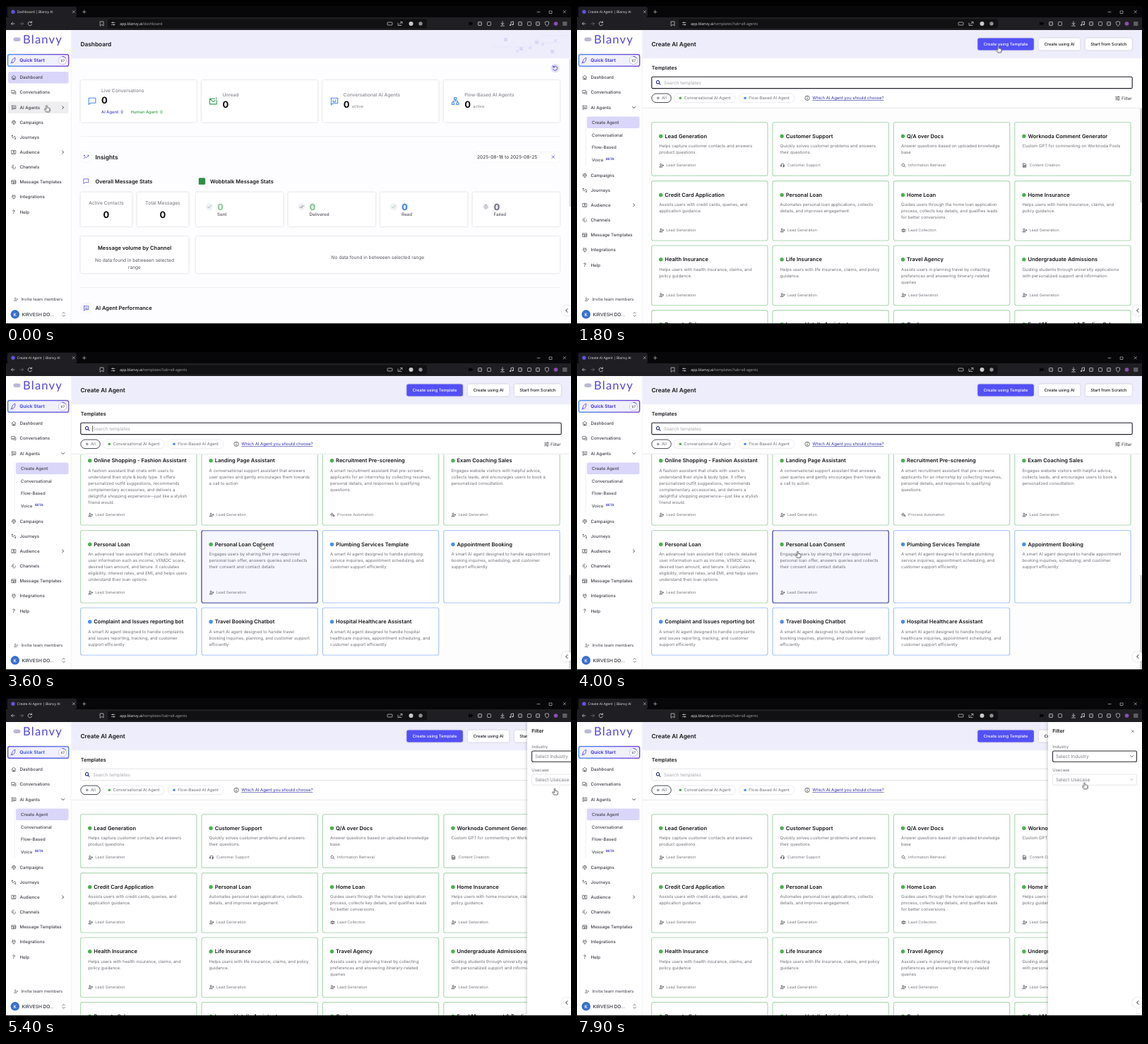
These frames come from a looping animation (800 px wide and 450 px high, 8000 ms). An HTML page:

```html
<!DOCTYPE html>
<html lang="en">
<head>
<meta charset="utf-8">
<title>Agent templates</title>
<style>
html,body{margin:0;width:100%;height:100%;overflow:hidden;background:#fff}
svg{display:block;width:800px;height:450px;font-family:Inter,sans-serif;text-rendering:geometricPrecision}
.ui{font-family:"Open Sans",sans-serif}
.brand{font-family:Lato,sans-serif;letter-spacing:1.2px}
.sh{filter:drop-shadow(0 .7px .9px #0003)}
.step{animation:8s step-end infinite}
.move{animation:8s linear infinite}
.pre{animation-name:pre}
.post{animation-name:post}
.closed{animation-name:closed}
.opened{animation-name:opened}
.low{animation-name:low}
.cards{animation-name:cards}
.focus{animation-name:focus}
.hover{animation-name:hover}
.scroll{animation-name:scroll}
.thumb{animation-name:thumb}
.panel{animation-name:panel;animation-timing-function:ease-out;filter:drop-shadow(-1px 0 2px #0003)}
.drop{animation-name:drop}
.pick{animation-name:pick}
.list{animation-name:list}
.bar{animation-name:bar}
.cursor{animation:cursor 8s ease-in-out infinite}
.caret{animation:blink .8s step-end -.45s infinite}
.glow{animation:glow 1s ease-in-out infinite alternate}
.tint{animation:tint 1s ease-in-out infinite alternate}
@keyframes pre{0%{opacity:1}7.5%,100%{opacity:0}}
@keyframes post{0%{opacity:0}7.5%,100%{opacity:1}}
@keyframes closed{0%{opacity:1}3.1%,100%{opacity:0}}
@keyframes opened{0%{opacity:0}3.1%,100%{opacity:1}}
@keyframes low{0%,2%{transform:translateY(0)}3.6%,100%{transform:translateY(75px)}}
@keyframes cards{0%{opacity:0}13.75%,100%{opacity:1}}
@keyframes focus{0%{opacity:1}66.25%,100%{opacity:0}}
@keyframes hover{
 0%{opacity:0;x:448px;y:164.5px;height:75.7px}
 30%{opacity:1;x:448px;y:164.5px;height:75.7px}
 35%{opacity:1;x:277px;y:247.7px;height:84.3px}
 37.5%{opacity:1;x:277px;y:339px;height:84.5px}
 42%{opacity:1;x:277px;y:522.5px;height:111px}
 45%{opacity:1;x:277px;y:641px;height:102.5px}
 56.5%{opacity:1;x:448px;y:430.7px;height:84.5px}
 60.5%{opacity:1;x:448px;y:339px;height:84.5px}
 62%{opacity:1;x:448px;y:247.7px;height:84.3px}
 63.5%,100%{opacity:0;x:448px;y:247.7px;height:84.3px}}
@keyframes scroll{
 0%,35.6%{transform:translateY(0)}38.6%,39.4%{transform:translateY(-166.5px)}
 45%,53.75%{transform:translateY(-388.5px)}58.6%,59.4%{transform:translateY(-138.5px)}
 63%,100%{transform:translateY(0)}}
@keyframes thumb{
 0%,35.6%{transform:translateY(0)}38.6%,39.4%{transform:translateY(73px)}
 45%,53.75%{transform:translateY(171px)}58.6%,59.4%{transform:translateY(61px)}
 63%,100%{transform:translateY(0)}}
@keyframes panel{0%,66.25%{transform:translateX(140px)}70%,100%{transform:translateX(0)}}
@keyframes drop{0%{opacity:0}75%{opacity:1}93.75%,100%{opacity:0}}
@keyframes pick{0%{transform:translateY(-33.2px)}76.5%{transform:translateY(-16.6px)}
 77.5%{transform:translateY(0)}80%{transform:translateY(16.6px)}81.5%,100%{transform:translateY(33.2px)}}
@keyframes list{0%,82.5%{transform:translateY(0)}86%,100%{transform:translateY(-66.4px)}}
@keyframes bar{0%,82.5%{transform:translateY(0)}86%,100%{transform:translateY(38px)}}
@keyframes cursor{
 0%,2.5%{transform:translate(57.5px,140.5px)}
 6.25%,8%{transform:translate(48px,162px)}
 20%,23.5%{transform:translate(596.5px,56.5px)}
 26%{transform:translate(616px,80px)}
 30%{transform:translate(520px,190px)}
 33.75%{transform:translate(470px,243px)}
 36.25%,42%{transform:translate(431px,253px)}
 47.5%,53.5%{transform:translate(312.5px,282px)}
 56.25%,61.5%{transform:translate(453.5px,262.5px)}
 65%,67.5%{transform:translate(777px,128px)}
 72.5%,75%{transform:translate(730px,81px)}
 78.75%{transform:translate(686.5px,146.5px)}
 82%,87.5%{transform:translate(692px,168px)}
 92.5%,94%{transform:translate(714px,84px)}
 97.5%,100%{transform:translate(718.5px,119.5px)}}
@keyframes blink{0%{opacity:1}50%,100%{opacity:0}}
@keyframes glow{from{opacity:0}to{opacity:1}}
@keyframes tint{from{fill:#4f3fe0}to{fill:#3f6fe6}}
</style>
</head>
<body>
<svg id="stage" viewBox="0 0 800 450"></svg>
<script>
const INK = '#17171c', GRAY = '#6f7078', INDIGO = '#4a45d6', GREEN = '#4caf50', BLUE = '#4a8df0';

// y is the middle of the capitals
const T = (x, y, size, str, fill = INK, weight = 400, anchor = 'start', extra = '') =>
  `<text x="${x}" y="${y + size * .36}" font-size="${size}" fill="${fill}" font-weight="${weight}" text-anchor="${anchor}" ${extra}>${str}</text>`;
const R = (x, y, w, h, fill, r = 0, stroke = 'none', sw = 1, extra = '') =>
  `<rect x="${x}" y="${y}" width="${w}" height="${h}" rx="${r}" fill="${fill}" stroke="${stroke}" stroke-width="${sw}" ${extra}/>`;
const C = (x, y, r, fill, stroke = 'none', sw = 1) =>
  `<circle cx="${x}" cy="${y}" r="${r}" fill="${fill}" stroke="${stroke}" stroke-width="${sw}"/>`;
const P = (d, stroke, sw = .8, fill = 'none') =>
  `<path d="${d}" fill="${fill}" stroke="${stroke}" stroke-width="${sw}" stroke-linecap="round" stroke-linejoin="round"/>`;
const G = (cls, ...parts) => `<g class="${cls}">${parts.join('')}</g>`;

// icons live in a 24 unit box, centred on x, y
const ICONS = {
  home: 'M3 11 12 3 21 11M5 10V21H19V10M10 21V15H14V21',
  chats: 'M3 3H16V13H7L3 16ZM19 8H21V21L17 18H8V16',
  chat: 'M3 4H21V17H8L3 21Z',
  bot: 'M3 4H21V18H9L4 22V4M9 9V11M15 9V11M8 14H16',
  signal: 'M4 17A9 9 0 1 1 20 17M8 15A5 5 0 1 1 16 15M12 12V21M9 21H15',
  route: 'M5 3V13A4 4 0 0 0 12 13V10A4 4 0 0 1 19 10V21M3 5H8M16 19H21',
  person: 'M3 4H21V20H3ZM12 7A2.5 2.5 0 1 1 11.9 7M7 18C8 13 16 13 17 18',
  link: 'M13 3C6 3 3 8 4 13M11 21C18 21 21 16 20 11M8 9L12 12 9 16M4 13L8 17',
  grid: 'M3 4H21V20H3ZM3 10H21M10 10V20M10 15H21',
  plug: 'M8 2V8M16 2V8M5 8H19V12A7 6 0 0 1 5 12ZM12 18V22',
  mail: 'M3 6H16M21 10V20H3V6L12 14 17 10M20 3V7',
  flow: 'M9 3H15V8H9ZM3 16H9V21H3ZM15 16H21V21H15ZM12 8V12M6 16V12H18V16',
  trend: 'M3 18L9 11 13 15 21 6M18 5H21V9M5 5V8M3.5 6.5H6.5',
  find: 'M16 16L21 21M10 3A7 7 0 1 1 9.9 3',
  lead: 'M9 4A4 4 0 1 1 8.9 4M2 20C2 13 16 13 16 20ZM20 9V15M17 12H23',
  team: 'M12 5A3 3 0 1 1 11.9 5M5 8A2 2 0 1 1 4.9 8M19 8A2 2 0 1 1 18.9 8M7 19C7 13 17 13 17 19ZM2 18C2 14 5 14 6 15M22 18C22 14 19 14 18 15',
  head: 'M4 14V11A8 8 0 0 1 20 11V18L14 21M4 12H7V17H4ZM17 12H20V17H17Z',
  doc: 'M5 2H14L19 7V22H5ZM8 11H16M8 15H16M8 18H13',
  gear: 'M9 6A5 5 0 1 1 8.9 6M9 3V5M9 17V19M2 11H4M14 11H16M19 15A3 3 0 1 1 18.9 15',
  check: 'M4 13L9 18 20 6', checks: 'M2 13L7 18 16 6M10 16L12 18 22 6',
  clock: 'M12 3A9 9 0 1 1 11.9 3M12 7V13M12 16V17'
};
const I = (name, x, y, size, color, sw = 2) =>
  `<g transform="translate(${x - size / 2} ${y - size / 2}) scale(${size / 24})">${P(ICONS[name], color, sw)}</g>`;

const defs = `<defs>
<linearGradient id="a"><stop stop-color="#3f8cf5"/><stop offset="1" stop-color="#7a35dd"/></linearGradient>
<linearGradient id="b"><stop stop-color="#7a35dd"/><stop offset="1" stop-color="#4fa6f5"/></linearGradient>
<clipPath id="view"><rect x="93" y="144.5" width="704" height="304.5"/></clipPath>
<clipPath id="menu"><rect x="673" y="96" width="120" height="122"/></clipPath></defs>`;

function browser() {
  const w = '#d4d4d8';
  const tab = s => T(15.5, 8.3, 4.9, s, '#e6e6ea');
  const url = s => T(161, 25, 5.25, `app.blanvy.ai<tspan fill="#a4a4aa">/${s}</tspan>`, '#ececf0');
  const small = [671, 684, 728, 741, 753].map((x, i) => R(x - 2.5, 22.5, 5, 5, i % 2 ? 'none' : '#38383c', .8, w, .7));
  return G('ui',
    R(0, 0, 800, 34, '#070709'), R(2, 1, 98, 15, '#1f1f23', 3), R(0, 16, 800, 18, '#1f1f23'),
    R(144, 18.5, 452, 13, '#111114', 3), C(10, 8.3, 2.7, '#6152e6'),
    G('step pre', tab('Dashboard | Blanvy AI'), url('dashboard')),
    G('step post', tab('Create AI Agent | Blanvy AI'), url('templates?tab=all-agents')),
    P('M94.2 6.6 97.4 9.8M97.4 6.6 94.2 9.8M108.5 8.3H113M110.7 6V10.5', w, .6),
    P('M752 8.5H756M789 6.5 792.5 10M792.5 6.5 789 10M769.5 7H773V10.5H769.5Z', w, .6),
    P('M12 25H7.5M9.5 23 7.5 25 9.5 27', w, .7), P('M20 25H24.5M22.5 23 24.5 25 22.5 27', '#77777c', .7),
    P('M36.3 23.4A2.8 2.8 0 1 0 36.6 26M36.5 21.8V23.6H34.6', w, .8),
    P('M133.5 22H138V28L135.8 26.3 133.5 28Z', w, .7),
    P('M149.5 23.5H154M149.5 26.5H154M151 22.6V24.4M152.8 25.6V27.4', w, .7),
    R(540, 23, 7, 4, 'none', .8, w, .7), P('M555 24V27.5H560M557 26 561 22.5M558.5 22.5H561V25', w, .7),
    C(573.5, 25, 3, '#c9c9cf'), C(587, 25, 2.7, '#8d8d94'),
    P('M655.5 23V27L658 25ZM658.3 23V27L661 25Z', '#000', .8, '#000'), small.join(''),
    P('M703 22V26M701 24.3 703 26.3 705 24.3M700.5 28H705.5', w, .8),
    P('M715 27V22.5L718.5 22V26', w, .8), C(714, 27, 1, w), C(717.5, 26.3, 1, w),
    P('M763.5 22.5 766 21.8 768.5 22.5V25Q768 27.5 766 28.4 764 27.5 763.5 25Z', w, .7),
    C(778.5, 25, 2.8, '#8b4fb0'), P('M788.5 23H794M788.5 25H794M788.5 27H794', w, .7));
}

function sidebar() {
  const item = (name, y, label) => I(name, 11, y, 7.5, '#3b3c46', 2) + T(19.5, y, 6.2, label, '#3d3e48', 500);
  const right = y => P(`M79.7 ${y - 1.8} 81.7 ${y} 79.7 ${y + 1.8}`, '#33343d', .9);
  const low = [['signal', 'Campaigns'], ['route', 'Journeys'], ['person', 'Audience'], ['link', 'Channels'],
    ['grid', 'Message Templates'], ['plug', 'Integrations']].map(([n, s], i) => item(n, 164.5 + i * 21.15, s));
  const sub = ['Create Agent', 'Conversational', 'Flow-Based', 'Voice'].map((s, i) => T(21, 164.5 + i * 17.9, 6.1, s, '#42434d', 500));
  return G('',
    R(0, 34, 92, 416, '#fff'), P('M92.3 34V450', '#ececf1', .7),
    R(10.5, 44.5, 10, 5.5, '#b9b8d8', 2.7),
    T(24, 47, 16.6, 'Blanvy', '#5146dc', 400, 'start', 'class="brand"'),
    G('sh', R(2.6, 68.6, 86, 16.6, '#f1f0fe', 2.5, 'url(#a)', 1.2)),
    R(2.6, 68.6, 86, 16.6, 'none', 2.5, 'url(#b)', 1.2, 'class="glow"'),
    P('M8 80Q8 75 13 73Q13.5 78 10.5 80ZM8.5 79 7 81', '#4f46e5', .8),
    T(19.2, 77, 6.5, 'Quick Start', '#4f3fe0', 700, 'start', 'class="tint"'),
    C(80, 77, 5.6, '#fff', '#c5c2ee', .9), P('M80 71.4A5.6 5.6 0 0 1 84.4 73.6', '#4f46e5', 1),
    T(80, 77, 4.6, '1/7', '#33343d', 500, 'middle'),
    G('step pre', R(3, 93, 85.5, 16.5, '#d9d6fa', 2)),
    item('home', 101, 'Dashboard'), item('chats', 122.2, 'Conversations'),
    G('step closed', R(3, 135.5, 85.5, 16.5, '#eeeef1', 2), right(143.6)),
    item('bot', 143.6, 'AI Agents'),
    G('step opened', P('M78.8 142.6 80.7 144.6 82.6 142.6', '#33343d', .9), P('M12.5 157V226', '#e6e6ee', .6)),
    G('step post', R(14, 156.5, 74.5, 16.5, '#d9d6fa', 2)),
    G('step opened', sub.join(''), T(41, 216, 4.5, 'BETA', INDIGO, 700)),
    G('move low', low.join(''), right(206.8), T(11, 291.5, 7.5, '?', '#3d3e48', 500, 'middle'), T(19.5, 291.5, 6.2, 'Help', '#3d3e48', 500)),
    I('lead', 14, 415, 6, '#44454f'), T(21.5, 415, 5.95, 'Invite team members', '#44454f'),
    C(12.8, 436.3, 6.2, '#3a6fd0'), T(12.8, 436.3, 6.2, 'K', '#fff', 600, 'middle'),
    T(22.5, 436.3, 6.6, 'KIRVESH DO...', '#33343d', 500),
    P('M80 435 81.6 433.3 83.2 435M80 437.6 81.6 439.3 83.2 437.6', '#44454f', .7));
}

function dashboard() {
  const box = (x, y, w, h) => R(x, y, w, h, '#fff', 2);
  const head = (x, y, icon, label, size = 7.5, color = INDIGO) =>
    R(x, y - 7, 14, 14, '#fff', 2, '#eeeef4', .6) + I(icon, x + 7, y, 9, color) + T(x + 20, y, size, label, INK, 600);
  const top = [['chat', 'Live Conversations', 'Live', BLUE], ['mail', 'Unread', '', '#3a9a54'],
    ['bot', 'Conversational AI Agents', 'active', BLUE], ['flow', 'Flow-Based AI Agents', 'active', BLUE]].map(([n, s, kind, c], i) => {
    const x = 105.5 + i * 171.4, y = kind === 'Live' ? 120 : 126;
    return I(n, x + 16.5, 134.5, 13, c) + T(x + 29.5, y, 6.65, s, '#868790', 500) +
      T(x + 29.5, y + 13.5, 13, '0', '#0c0c10', 700) +
      (kind === 'active' ? T(x + 41.5, y + 16, 5.7, 'active', '#85868e') : '');
  });
  const stats = [['check', 'Sent', '#8fc99b', '#6b6c74'], ['checks', 'Delivered', '#7ac48a', '#6b6c74'],
    ['check', 'Read', '#3f7fe8', '#3fae5a'], ['clock', 'Failed', '#6b6b80', '#6b6c74']].map(([n, s, c, k], i) => {
    const x = 269 + i * 130.5;
    return C(x + 19, 284, 5, '#f1f1f5') + I(n, x + 19, 284, 6.5, k) + C(x + 34.5, 284, 5.5, c + '22') +
      T(x + 30.2, 284, 12.5, '0', c, 700) + T(x + 30, 294.5, 6.2, s, '#55565f', 500);
  });
  const cells = [0, 1, 2, 3];
  return G('step pre',
    R(92.6, 34, 708, 416, '#fdfdff'), R(92.6, 34, 708, 40, '#eeedfb'),
    cells.map(i => R(705 + i * 22, 45 + i * 13 % 22, 5, 5, '#d9d7f6') + R(722 + i * 18, 62 - i * 5, 4, 4, '#e0def8')).join(''),
    P('M690 58H740L758 42H796M730 68 752 52H785', '#e2e0f8', .6),
    T(105.5, 54, 8.3, 'Dashboard', INK, 600),
    C(777.5, 88, 6.3, '#e2e0fb'), P('M775 86.2A3.1 3.1 0 1 1 774.6 89.4M774.6 84.6V86.7H776.8', INDIGO, .9),
    G('sh', cells.map(i => box(105.5 + i * 171.4, 105, 164.3, 59.5)).join('')), top.join(''),
    T(135, 150, 5.85, 'AI Agent: 0', INDIGO, 500), T(176.5, 150, 5.85, 'Human Agent: 0', '#37a04b', 500),
    P('M106 184.7H784M106 398.5H784', '#e9e9f0', .7),
    head(106.5, 213.7, 'trend', 'Insights', 8.4), R(663.5, 206.5, 120, 14.6, '#fff', 2, '#f0f0f4', .6),
    T(667, 213.8, 6.6, '2025-08-18 to 2025-08-25', '#2a2b33'), P('M773 211.8 776.6 215.4M776.6 211.8 773 215.4', INDIGO, .8),
    head(106.5, 247.8, 'chat', 'Overall Message Stats'),
    R(271, 241.5, 13, 13, '#fff', 2, '#eeeef4', .6), R(272.8, 243.3, 9.4, 9.4, '#2f8f46', 1.5),
    T(289, 247.8, 7.5, 'Wobbtalk Message Stats', INK, 600),
    G('sh', box(105.5, 263.5, 73, 48.5), box(185.5, 263.5, 73, 48.5), cells.map(i => box(269 + i * 130.5, 263.5, 123.5, 48.5)).join(''),
      box(105.5, 326, 153, 52), box(269, 326, 515, 52)),
    T(142, 279, 6.65, 'Active Contacts', '#6f7078', 400, 'middle'), T(142, 295, 13, '0', '#0c0c10', 700, 'middle'),
    T(222, 279, 6.65, 'Total Messages', '#6f7078', 400, 'middle'), T(222, 295, 13, '0', '#0c0c10', 700, 'middle'),
    stats.join(''),
    T(182, 342, 7.5, 'Message volume by Channel', INK, 600, 'middle'),
    T(182, 359.8, 6.55, 'No data found in betweeen selected', '#55565f', 400, 'middle'), T(182, 370, 6.55, 'range', '#55565f', 400, 'middle'),
    T(526.3, 355.3, 6.55, 'No data found in betweeen selected range', '#55565f', 400, 'middle'),
    head(106.5, 427.5, 'bot', 'AI Agent Performance'),
    R(797.6, 75, 2, 209, '#d6d6da', 1));
}

const LEAD = 'lead:Lead Generation';
const ROWS = [
  { y: 164.5, h: 75.7, cards: [
    ['Lead Generation', 'Helps capture customer contacts and answers|product questions.', LEAD],
    ['Customer Support', 'Quickly solves customer problems and answers|their questions.', 'head:Customer Support'],
    ['Q/A over Docs', 'Answer questions based on uploaded knowledge|base', 'find:Information Retrieval'],
    ['Worknoda Comment Generator', 'Custom GPT for commenting on Worknoda Posts', 'doc:Content Creation']] },
  { y: 247.7, h: 84.3, cards: [
    ['Credit Card Application', 'Assists users with credit cards, queries, and|application guidance.', LEAD],
    ['Personal Loan', 'Automates personal loan applications, collects|details, and improves engagement.', LEAD],
    ['Home Loan', 'Guides users through the home loan application|process, collects key details, and qualifies leads|for better conversions.', 'team:Lead Collection'],
    ['Home Insurance', 'Helps users with home insurance, claims, and|policy guidance.', LEAD]] },
  { y: 339, h: 84.5, cards: [
    ['Health Insurance', 'Helps users with health insurance, claims, and|policy guidance.', LEAD],
    ['Life Insurance', 'Helps users with life insurance, claims, and policy|guidance.', LEAD],
    ['Travel Agency', 'Assists users in planning travel by collecting|preferences and answering itinerary-related|queries', LEAD],
    ['Undergraduate Admissions', 'Guiding students through university applications|with personalized support and information.', LEAD]] },
  { y: 430.7, h: 84.5, cards: [
    ['Property Sales', 'Collects buyer details and answers real estate|queries about property and pricing.', LEAD],
    ["Luxury Hotel's Assistant", 'Helps users with hotel booking queries and|collects reservation preferences.', LEAD],
    ['Car Insurance', 'Collects user details for car insurance and|answers questions about coverage and claims.', LEAD],
    ['Fund Management &amp; Trading Sales', 'Qualifies traders by collecting details like|experience, return goals, and capital, and nudges|them to invest in an automated trading solution.', LEAD]] },
  { y: 522.5, h: 111, cards: [
    ['Online Shopping - Fashion Assistant', 'A fashion assistant that chats with users to|understand their style &amp; body type. It offers|personalized outfit suggestions, recommends|complementary accessories, and delivers a|delightful shopping experience—just like a stylish|friend would.', LEAD],
    ['Landing Page Assistant', 'A conversational support assistant that answers|user queries and gently encourages them towards|a call to action.', LEAD],
    ['Recruitment Pre-screening', 'A smart recruitment assistant that pre-screens|applicants for an internship by collecting resumes,|personal details, and responses to qualifying|questions.', 'gear:Process Automation'],
    ['Exam Coaching Sales', 'Engages website visitors with helpful advice,|collects leads, and encourages users to book a|personalized consultation.', LEAD]] },
  { y: 641, h: 102.5, cards: [
    ['Personal Loan', 'An advanced loan assistant that collects detailed|user information such as income, VEMOC score,|desired loan amount, and tenure. It calculates|eligibility, interest rates, and EMI, and helps users|understand their loan options.', LEAD],
    ['Personal Loan Consent', 'Engages users by sharing their pre-approved|personal loan offer, answers queries and collects|their consent and contact details', LEAD],
    ['Plumbing Services Template', 'A smart AI agent designed to handle plumbing|service inquiries, appointment scheduling, and|customer support efficiently'],
    ['Appointment Booking', 'A smart AI agent designed to handle appointment|booking inquiries, scheduling, and customer|support efficiently']] },
  { y: 750.5, h: 67, cards: [
    ['Complaint and Issues reporting bot', 'A smart AI agent designed to handle complaints|and issues reporting, tracking, and customer|support efficiently'],
    ['Travel Booking Chatbot', 'A smart AI agent designed to handle travel|booking inquiries, planning, and customer support|efficiently'],
    ['Hospital Healthcare Assistant', 'A smart AI agent designed to handle hospital|healthcare inquiries, appointment scheduling, and|customer support efficiently']] }
];

function templates() {
  let boxes = '', texts = '';
  for (const { y, h, cards } of ROWS) cards.forEach(([title, body, foot], i) => {
    const x = 105.6 + i * 171.4;
    boxes += R(x, y, 164.3, h, '#fff', 2.5, foot ? '#b2dab6' : '#aac8f5', 1.2);
    texts += C(x + 13.1, y + 19.7, 2.7, foot ? GREEN : BLUE) + T(x + 18.7, y + 19.5, 7.5, title, INK, 600);
    body.split('|').forEach((s, n) => texts += T(x + 10.6, y + 33.5 + n * 9, 6, s, GRAY));
    if (foot) {
      const [icon, label] = foot.split(':');
      texts += I(icon, x + 14, y + h - 14.7, 6.5, '#3a3a42', 2.6) + T(x + 20.7, y + h - 14.7, 5.42, label, '#77787f');
    }
  });
  const button = (x, w, s, fill, ink) => G('sh', R(x, 45.5, w, 17, fill, 2.5)) + T(x + w / 2, 54, 5.85, s, ink, 500, 'middle');
  const pill = (x, w, s, dot, line, sw) => R(x, 124, w, 12.6, '#fff', 6.3, line, sw) + C(x + 9, 130.3, 1.8, dot) + T(x + 14.2, 130.3, 5.8, s, GRAY);
  return G('step post',
    R(92.6, 34, 708, 416, '#fff'), R(92.6, 34, 708, 40, '#eeedfb'),
    T(105.5, 54, 8.3, 'Create AI Agent', INK, 600),
    button(567.3, 79.5, 'Create using Template', '#5350f5', '#fff'),
    button(653.8, 58.5, 'Create using AI', '#fff', INK), button(719.8, 66, 'Start from Scratch', '#fff', INK),
    T(105.8, 87, 7.15, 'Templates', INK, 600),
    R(105.8, 100.3, 680.4, 16.3, '#fff', 1.5, '#dcdce4', .8),
    G('step focus', R(105.8, 100.3, 680.4, 16.3, 'none', 1.5, '#25252d', 1.1), R(122.3, 104.3, .7, 8.4, '#222', 0, 'none', 0, 'class="caret"')),
    I('find', 115.2, 108.4, 7.5, '#2a2a8a', 3.4), T(123, 108.4, 6.45, 'Search templates', '#a6a7ae'),
    pill(105.8, 27.5, 'All', '#9a9aa2', '#33343d', .9), pill(137.3, 87, 'Conversational AI Agent', GREEN, '#e3e3ea', .7),
    pill(229, 79, 'Flow-Based AI Agent', BLUE, '#e3e3ea', .7),
    C(326, 130.3, 3.2, 'none', '#33343d', .7), P('M326 130V132M326 128.6V128.7', '#33343d', .8),
    T(333.3, 130.3, 5.95, 'Which AI Agent you should choose?', '#2f2fa8', 400, 'start', 'text-decoration="underline"'),
    P('M762.5 128.5H768.5M762.5 130.6H768.5M762.5 132.7H768.5M766.5 127.7V129.3M764.3 129.8V131.4M766.5 131.9V133.5', '#3a3a42', .6),
    T(771, 130.4, 6.2, 'Filter', '#3a3a42'),
    R(92.6, 144, 708, 306, '#fdfdfe'), P('M92.6 144.2H797', '#e2e2e8', .8),
    `<g clip-path="url(#view)" class="step cards"><g class="move scroll">${boxes}` +
      R(448, 164.5, 164.3, 75.7, '#f6f6fe', 2.5, '#4543b0', 1.2, 'class="step hover"') + texts + '</g></g>',
    G('step cards', R(797.5, 144.5, 2.2, 134, '#cfcfd4', 1, 'none', 0, 'class="move thumb"')));
}

function filterPanel() {
  const names = ['Social Media', 'Banking', 'Insurance', 'Travel', 'Education', 'Real Estate', 'Hospitality', 'Finance', 'Healthcare', 'E-commerce', 'Services'];
  const select = (y, label, hint, line, sw, ink) => T(673.3, y - 14, 5.9, label, '#6b6c75') + R(673.5, y - 7.6, 119, 15.2, '#fff', 2, line, sw) +
    T(678, y, 6.6, hint, '#7b7c85') + P(`M783.5 ${y - 1} 785.5 ${y + 1} 787.5 ${y - 1}`, ink, .9);
  return G('move panel',
    R(667, 34, 140, 416, '#fff'), T(673.3, 47, 6.9, 'Filter', INK, 600), P('M785.3 45.5 788.5 48.7M788.5 45.5 785.3 48.7', '#55565f', .7),
    select(82.6, 'Industry', 'Select Industry', '#2b2b33', 1.1, '#44454f'), select(115.5, 'Usecase', 'Select Usecase', '#e0e0e6', .8, '#b5b6bd'),
    G('step drop',
      G('sh', R(673, 95, 120, 123.5, '#fff', 2)), R(674, 128.8, 114, 16.6, '#efeffb', 0, 'none', 0, 'class="step pick"'),
      `<g clip-path="url(#menu)"><g class="move list">${names.map((s, i) => T(678.3, 104 + i * 16.6, 6.6, s, '#2c2d35')).join('')}</g></g>`,
      R(788, 95.5, 4.5, 122.5, '#fafafa'), R(788.6, 101, 3, 71, '#8d8d92', 1.5, 'none', 0, 'class="move bar"'),
      P('M789 98 790.2 96.6 791.4 98ZM789 214 790.2 215.4 791.4 214Z', '#66666c', .4, '#66666c')));
}

const HAND = 'M-.9 .9C-.9 -.3 .9 -.3 .9 .9V3.4L3.6 3.9Q4.8 4.2 4.6 5.6L4 9H-1L-3.4 5.8Q-3.6 4.6 -2.4 4.9L-.9 6Z';

document.getElementById('stage').innerHTML = defs + R(0, 0, 800, 450, '#fff') +
  dashboard() + templates() + sidebar() + filterPanel() + browser() +
  G('sh', C(794, 431, 7.5, '#fff')) + P('M795 428.6 792.6 431 795 433.4', '#22222a', 1) +
  R(0, 449, 800, 1, '#111') + G('cursor', P(HAND, '#2a2a2e', .7, '#fff'));
</script>
</body>
</html>
```
